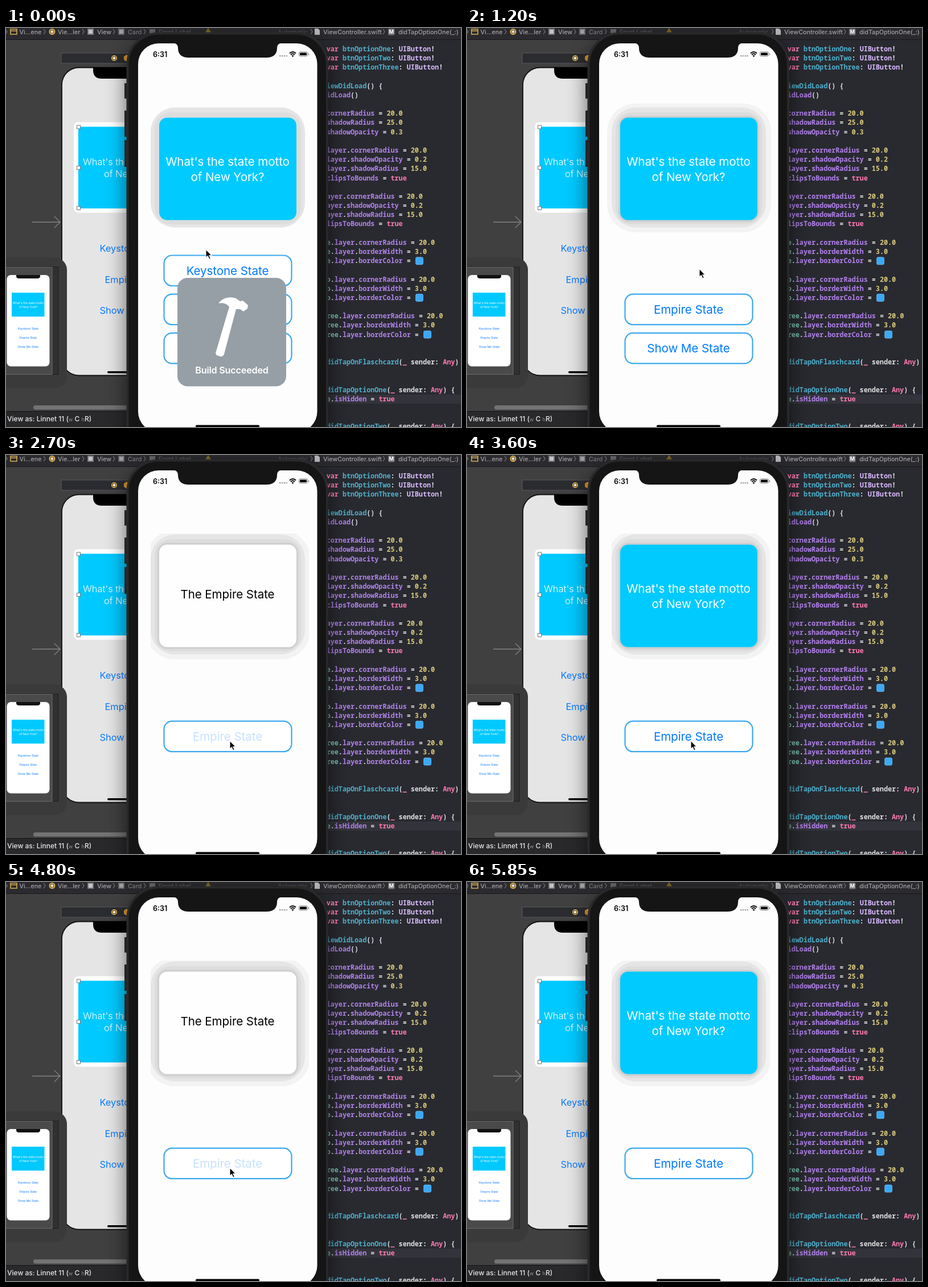
Write an HTML page that moves like this. It is 799 by 701 pixels and loops after 6100 ms.

```html
<!DOCTYPE html>
<html lang="en">
<head>
<meta charset="utf-8">
<title>Flashcard demo</title>
<style>
  html, body { margin: 0; width: 100%; height: 100%; overflow: hidden; background: #404041; }
  svg { display: block; font-family: Inter, "Open Sans", sans-serif; }
  text { white-space: pre; }
  .mid { text-anchor: middle; }
  .app { font-size: 20.6px; letter-spacing: -.1px; text-anchor: middle; }
  .board { font-size: 16.4px; }
  .tiny { font-size: 5.1px; text-anchor: middle; }
  .bar { font-size: 10.7px; font-weight: 500; fill: #a5a5a8; }
  .code { font: 600 11.75px "Noto Sans Mono", "DejaVu Sans Mono", monospace; fill: #dfdfe0; }
  .key { fill: #ff7ab2; }
  .num { fill: #d9c97c; }
  .type { fill: #dabaff; }
  .decl { fill: #4eb0cc; }
  .own { fill: #78c2b3; }
  .prop { fill: #b281eb; }
</style>
</head>
<body>
<svg width="799" height="701" viewBox="0 0 799 701">
  <defs>
    <filter id="soft" x="-30%" y="-30%" width="160%" height="160%"><feGaussianBlur stdDeviation="18"/></filter>
    <clipPath id="ringClip"><rect id="ringArea" x="240" y="125" width="300" height="245"/></clipPath>
  </defs>

  <!-- Storyboard canvas -->
  <rect width="400" height="701" fill="#404041"/>
  <rect x="97" y="44" width="300" height="18" fill="#2b2c30" stroke="#59595c"/>
  <circle cx="190" cy="53" r="5" fill="#e0b34c"/>
  <rect x="187.5" y="50.500" width="5" height="5" fill="#fff" stroke="#554422"/>
  <path d="M207 50l5-3 5 3v6l-5 3-5-3z" fill="#d9922f"/>
  <rect x="98" y="69.500" width="290" height="541" rx="30" fill="#e5e5e6" stroke="#111" stroke-width="1.800"/>
  <path d="M153 69V74Q153 89 168 89H330V69z" fill="#000"/>
  <rect x="178" y="603" width="120" height="3.500" rx="1.700" fill="#000"/>
  <rect x="119" y="165.500" width="200" height="159" rx="8" fill="#fff"/>
  <rect x="127" y="173.500" width="192" height="143.500" fill="#00c9ff"/>
  <g class="board" fill="#fff" font-weight="300">
    <text x="135" y="241">What's the state motto</text>
    <text x="172" y="262">of New York?</text>
  </g>
  <g class="board" fill="#087bff">
    <text x="164.500" y="393">Keystone State</text>
    <text x="173.500" y="448">Empire State</text>
    <text x="164.500" y="502">Show Me State</text>
  </g>
  <g fill="#fff" stroke="#777">
    <rect x="124.500" y="171" width="6" height="6"/>
    <rect x="124.500" y="242.500" width="6" height="6"/>
    <rect x="124.500" y="313.500" width="6" height="6"/>
  </g>
  <path d="M46 341H95M85 331L95 341L85 351" fill="none" stroke="#828283" stroke-width="1.300"/>

  <!-- Minimap and footer -->
  <rect x="-20" y="403" width="127" height="230" rx="22" fill="#3a3a3b"/>
  <rect x="-2" y="420" width="94" height="188.500" fill="#303031" stroke="#1d1d1e"/>
  <rect x="-2" y="420.500" width="83" height="188" fill="#4a4a4b" stroke="#6b6b6c"/>
  <rect x="1.500" y="434" width="75" height="160.500" rx="7" fill="#fff"/>
  <path d="M18 434H60V436Q60 440 55 440H23Q18 440 18 436z" fill="#111"/>
  <rect x="10" y="465" width="57.500" height="42" fill="#00c9ff"/>
  <g class="tiny" fill="#fff"><text x="39" y="485">What's the state motto</text><text x="39" y="491.500">of New York?</text></g>
  <g class="tiny" fill="#087bff">
    <text x="39" y="530">Keystone State</text><text x="39" y="546">Empire State</text><text x="39" y="562">Show Me State</text>
  </g>
  <rect x="48" y="663" width="300" height="7.500" rx="3.700" fill="#737374"/>
  <rect y="673" width="400" height="28" fill="#29292c"/>
  <path d="M0 673.500H400" stroke="#151516"/>
  <text x="2" y="691" font-size="12" font-weight="500" fill="#e9e9ea">View as: Linnet 11 (<tspan font-size="9" fill="#818183">w</tspan> C <tspan font-size="9" fill="#818183">h</tspan>R)</text>

  <!-- Code editor -->
  <rect x="400" width="399" height="701" fill="#292a30"/>
  <rect x="400" y="644" width="399" height="16" fill="#33343b"/>
  <g id="code" class="code"></g>

  <!-- Path bar -->
  <rect width="799" height="20" fill="#2b2b2f"/>
  <path d="M0 20.500H799" stroke="#19191b"/>
  <g class="bar">
    <text x="23.500" y="10.500">Vi...ene</text><text x="91" y="10.500">Vie...ler</text>
    <text x="160" y="10.500">View</text><text x="214" y="10.500" opacity=".65">Card</text>
    <text x="268" y="10.500" opacity=".4">Front Label</text><text x="477" y="10.500" opacity=".3">Automatic</text>
    <text x="557" y="10.500">ViewController.swift</text><text x="689" y="10.500">didTapOptionOne(_:)</text>
  </g>
  <g fill="none" stroke="#77777a" stroke-width="1.200">
    <path d="M-1 2l3 4.500-3 4.500M66 2l3 4.500-3 4.500M134 2l3 4.500-3 4.500M188 2l3 4.500-3 4.500M242 2l3 4.500-3 4.500M535 2l3 4.500-3 4.500M662 2l3 4.500-3 4.500"/>
  </g>
  <path d="M8 2H19V11H8zM8 5H19" fill="none" stroke="#d5ac55" stroke-width="1.600"/>
  <circle cx="81" cy="6.500" r="5.500" fill="#d5ac55"/>
  <rect x="78.500" y="4" width="5" height="5" fill="#eee" stroke="#664d20"/>
  <g fill="#c5c5c7" stroke="#77777a" stroke-width="2">
    <rect x="144" y="2" width="9" height="9"/><rect x="198" y="2" width="9" height="9" opacity=".75"/>
  </g>
  <path d="M252 2H262V10H252z" fill="#66666a"/>
  <path d="M355 0l6 9H349z" fill="#806923"/>
  <path d="M542 1H548L551 4V12H542z" fill="#b9b9bc"/>
  <rect x="671" y="1" width="11.500" height="11.500" rx="2" fill="#737378"/>
  <text x="676.800" y="10.200" class="mid" font-size="9" font-weight="700" fill="#fff">M</text>

  <!-- Simulator body -->
  <rect x="212" y="20" width="354" height="760" rx="55" filter="url(#soft)" opacity=".56"/>
  <path d="M208 97h5v27h-5zM208 145h5v46h-5zM208 197h5v47h-5z" fill="#242426"/>
  <rect x="213.500" y="9.500" width="350.500" height="760" rx="54" fill="#151516" stroke="#29292b" stroke-width="4"/>
  <rect x="232" y="27" width="314.500" height="683" rx="36" fill="#fdfdfd"/>
  <path d="M290 26Q302 26 302 35Q302 52 321 52H457Q476 52 476 35Q476 26 488 26z" fill="#151516"/>
  <text x="258" y="50.500" font-size="12.500" font-weight="600">6:31</text>
  <path d="M480 49h14" stroke="#aaa" stroke-width="2.400" stroke-dasharray="2.500 1.300"/>
  <g fill="none" stroke="#000" stroke-width="1.900">
    <path d="M498 44.500Q503.500 39.500 509 44.500M500 47Q503.500 43.700 507 47"/>
  </g>
  <path d="M501.500 48.500Q503.500 47 505.500 48.500L503.500 51z"/>
  <rect x="514.500" y="42" width="15" height="7.500" rx="2.200" fill="none" stroke="#777"/>
  <rect x="516" y="43.500" width="12" height="4.500" rx="1"/>
  <path d="M531.500 44.500v3" stroke="#777" stroke-width="1.200"/>
  <rect x="333" y="697.500" width="112" height="4.500" rx="2"/>

  <!-- App -->
  <g clip-path="url(#ringClip)">
    <rect id="outerRing" x="246" y="132.500" width="288" height="226.500" rx="50" fill="#f3f3f3"/>
    <rect x="254" y="139.500" width="271" height="211" rx="43" fill="#e5e5e5"/>
    <rect x="261" y="148" width="257" height="197" rx="28" fill="#dddddd"/>
    <rect id="innerRing" x="266" y="154" width="247" height="187" rx="18" fill="#d0d0d0"/>
  </g>
  <rect id="card" x="269" y="157.500" width="241" height="180" rx="14"/>
  <g id="question" class="app" fill="#fff">
    <text x="389" y="242">What's the state motto</text><text x="389" y="269">of New York?</text>
  </g>
  <text id="answer" class="app" x="389" y="252">The Empire State</text>
  <g id="options"></g>

  <g id="notice">
    <rect x="301" y="439" width="191" height="190.500" rx="18" fill="#969fa5"/>
    <path fill="#fff" d="M373 484C380 474 392 471 404 475L411 480L416 479L425 487L424 493L417 498L411 494L404 494L383 573Q381 578 376 577L370 575Q367 572 369 568L392 490C388 484 380 482 373 484z"/>
    <text x="396.500" y="606.500" class="mid" font-size="16.300" font-weight="600" letter-spacing="-.25" fill="#fff">Build Succeeded</text>
  </g>
  <path id="cursor" d="M0 0V14.500L3.300 11.500L5.800 17L8.300 15.900L5.900 10.600H10.300z" stroke="#fff" stroke-width="1.100"/>
</svg>

<script>
const $ = id => document.getElementById(id);
const LOOP = 6100, STEP = 150, ADVANCE = 7.05, CODE_X = 562.7, ROW = 16.18;

// Row number followed by the visible part of that line; # marks a colour swatch.
const border = name => [`${name}.layer.cornerRadius = 20.0`, `${name}.layer.borderWidth = 3.0`, `${name}.layer.borderColor = #`];
const blocks = [
  [0, "var btnOptionOne: UIButton!", "var btnOptionTwo: UIButton!", "var btnOptionThree: UIButton!"],
  [4, "iewDidLoad() {", "idLoad()"],
  [7, "cornerRadius = 20.0", "shadowRadius = 25.0", "shadowOpacity = 0.3"],
  [11, "layer.cornerRadius = 20.0", "layer.shadowOpacity = 0.2", "layer.shadowRadius = 15.0", "clipsToBounds = true"],
  [16, "ayer.cornerRadius = 20.0", "ayer.shadowOpacity = 0.2", "ayer.shadowRadius = 15.0", "lipsToBounds = true"],
  [21, ...border("e")], [25, ...border("o")], [29, ...border("ree")],
  [34, "didTapOnFlaschcard(_ sender: Any) {"],
  [37, "didTapOptionOne(_ sender: Any) {", "e.isHidden = true"],
  [41, "didTapOptionTwo(_ sender: Any) {"]
];
const token = /(\b(?:var|true|Any|_)\b)|(\d+\.\d)|(UIButton)|(btn\w+|didTap\w+|iewDidLoad)|(^(?:e|o|ree)(?=\.))|(\b(?!sender)[a-z]\w*)/g;
const classes = ["key", "num", "type", "decl", "own", "prop"];
const colour = line => line.replace(token, (word, ...groups) =>
  `<tspan class="${classes[groups.findIndex(Boolean)]}">${word}</tspan>`);

$("code").innerHTML = blocks.map(([first, ...lines]) => lines.map((line, i) => {
  const y = 41 + (first + i) * ROW, mark = line.indexOf("#");
  const swatch = mark < 0 ? "" :
    `<rect x="${CODE_X + mark * ADVANCE + 1.6}" y="${y - 10.5}" width="13" height="13" rx="2.5" fill="#3ba9f5" stroke="#76c4fa" stroke-width=".7"/>`;
  return `<text x="${CODE_X}" y="${y}">${colour(line.replace("#", ""))}</text>${swatch}`;
}).join("")).join("");

$("options").innerHTML = ["Keystone State", "Empire State", "Show Me State"].map((label, i) => {
  const y = 399.5 + i * 68.2;
  return `<g><rect x="277.500" y="${y}" width="224" height="53.500" rx="14" fill="#fff" stroke="#3ba9f0" stroke-width="2.200"/>
    <text class="app" x="389" y="${y + 34.3}" fill="#007aff">${label}</text></g>`;
}).join("");
const [keystone, empire, showMe] = $("options").children;

const taps = [2700, 3150, 3900, 4200, 4800, 5100];
const path = [
  [0, 351, 389], [150, 351, 389], [750, 408, 423], [1200, 408, 423], [1500, 396, 561], [2100, 396, 561],
  [2400, 393, 502], [5250, 393, 502], [5400, 405, 510], [5550, 510, 575], [5700, 755, 686], [5850, 930, 760], [LOOP, 930, 760]
];

function cursorAt(t) {
  const i = path.findIndex(p => p[0] > t);
  const [t0, x0, y0] = path[i - 1], [t1, x1, y1] = path[i];
  const p = (t - t0) / (t1 - t0), ease = p * p * (3 - 2 * p);
  return [x0 + (x1 - x0) * ease, y0 + (y1 - y0) * ease];
}

const show = (node, visible) => node.setAttribute("visibility", visible ? "visible" : "hidden");
const setTextOpacity = (option, value) => option.lastElementChild.setAttribute("opacity", value);

function draw(t) {
  t = Math.floor(t / STEP) * STEP;
  const past = taps.filter(tap => tap <= t);
  const flipped = past.length % 2 === 1;

  show($("question"), !flipped);
  show($("answer"), flipped);
  $("card").setAttribute("fill", flipped ? "#fefefe" : "#00caff");
  show($("outerRing"), t >= 1050);
  show($("innerRing"), t >= 1050);
  const clipped = t >= 2700;
  $("ringArea").setAttribute("x", clipped ? 254 : 240);
  $("ringArea").setAttribute("y", clipped ? 138 : 125);
  $("ringArea").setAttribute("width", clipped ? 278 : 300);

  show(keystone, t < 1200);
  show(showMe, t < 2100);
  setTextOpacity(keystone, t >= 1050 ? .22 : 1);
  setTextOpacity(showMe, t >= 1950 ? .22 : 1);
  const sinceTap = past.length ? t - past.at(-1) : Infinity;
  setTextOpacity(empire, Math.min(1, .22 + .78 * sinceTap / 450));

  $("notice").setAttribute("opacity", Math.max(0, 1 - t / 600));
  $("cursor").setAttribute("transform", `translate(${cursorAt(t)})`);
}

const start = performance.now();
function tick() {
  draw((performance.now() - start) % LOOP);
  requestAnimationFrame(tick);
}
tick();
</script>
</body>
</html>
```
